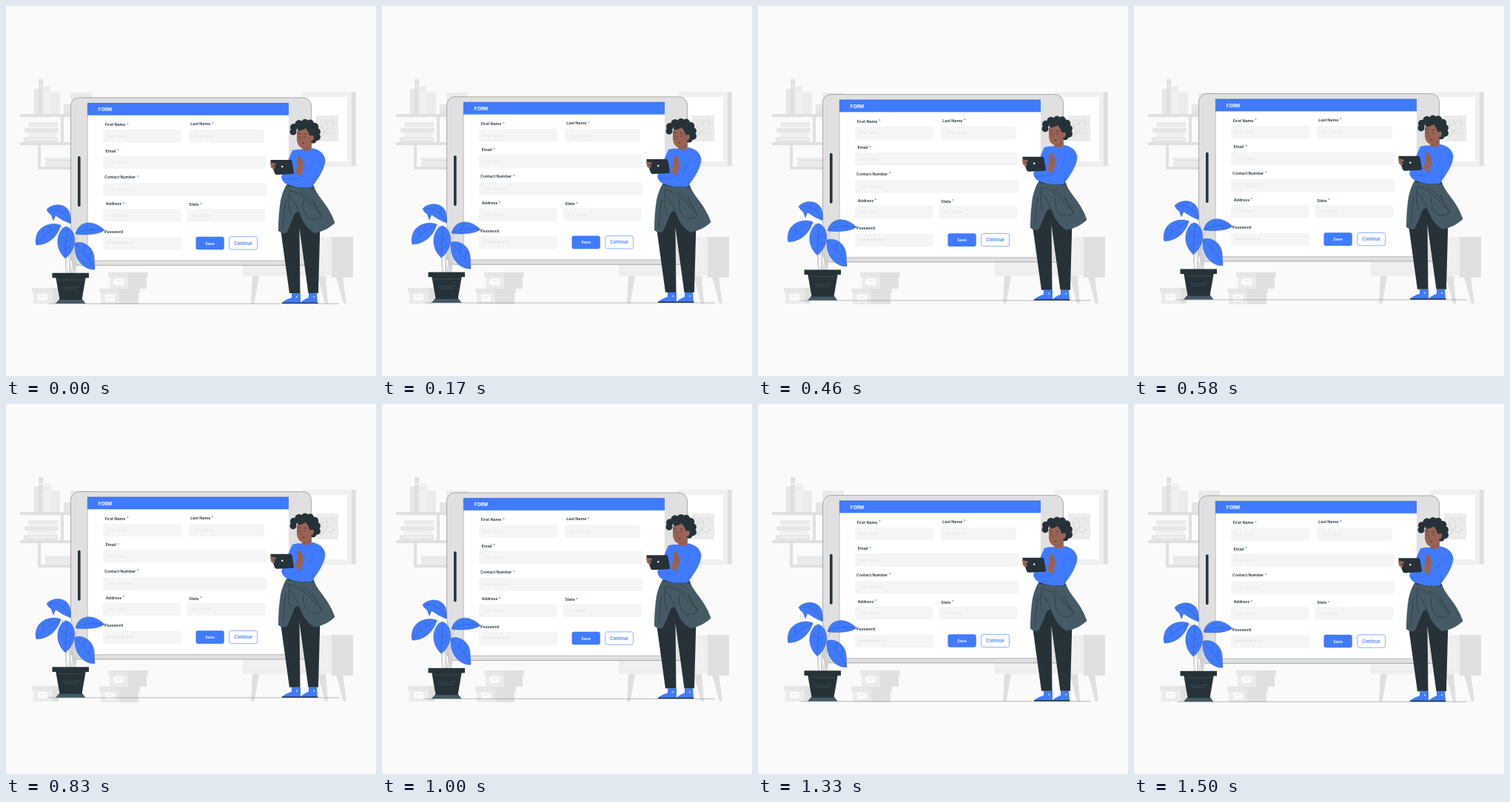
These frames come from a looping animation (500 px wide and 500 px high, 1.54 s). An HTML page with a canvas:

```html
<!DOCTYPE html>
<html lang="en">
<head>
<meta charset="utf-8">
<title>Form illustration</title>
<style>
  html, body { margin: 0; width: 100%; height: 100%; overflow: hidden; background: #fafafa; }
  canvas { display: block; width: 500px; height: 500px; }
</style>
</head>
<body>
<canvas id="stage"></canvas>
<script>
const LOOP = 1540, LIFT = 5.8, LEAD = 60, BASE = 0.15;
const BLUE = '#407bff', DARK = '#263238', SLATE = '#455a64', SKIN = '#996456';
const G1 = '#e0e0e0', G2 = '#e6e6e6', G3 = '#ebebeb', G4 = '#f0f0f0', G5 = '#f5f5f5';
const canvas = document.getElementById('stage');
const ctx = canvas.getContext('2d');
const scale = window.devicePixelRatio || 1;
canvas.width = canvas.height = 500 * scale;

function rect(x1, y1, x2, y2, fill) {
  ctx.fillStyle = fill;
  ctx.fillRect(x1, y1, x2 - x1, y2 - y1);
}

function round(x1, y1, x2, y2, r, fill, line, width = 0.6) {
  ctx.beginPath();
  ctx.roundRect(x1, y1, x2 - x1, y2 - y1, r);
  ctx.fillStyle = fill;
  ctx.fill();
  if (line) {
    ctx.strokeStyle = line;
    ctx.lineWidth = width;
    ctx.stroke();
  }
}

function shape(d, fill, line, width = 0.5) {
  const path = new Path2D(d);
  if (fill) {
    ctx.fillStyle = fill;
    ctx.fill(path);
  }
  if (line) {
    ctx.strokeStyle = line;
    ctx.lineWidth = width;
    ctx.stroke(path);
  }
}

function dot(x, y, r, fill) {
  ctx.beginPath();
  ctx.arc(x, y, r, 0, 7);
  ctx.fillStyle = fill;
  ctx.fill();
}

function text(str, x, y, size, weight, fill, align = 'left') {
  ctx.font = `${weight} ${size}px Inter, sans-serif`;
  ctx.textAlign = align;
  ctx.textBaseline = 'alphabetic';
  ctx.fillStyle = fill;
  ctx.fillText(str, x, y);
  return ctx.measureText(str).width;
}

function bookshelf() {
  rect(87, 117, 116, 128, G3);
  rect(38, 112, 44, 146, G2);
  rect(44, 99, 50, 146, G1);
  rect(50, 108, 61, 146, G4);
  rect(52, 113, 59, 114, G1);
  rect(61, 117, 73, 146, G3);
  rect(78, 133, 88, 146, G2);
  rect(44, 107, 50, 109, G4);
  round(30, 157, 70, 164, 2, G3);
  round(25, 165, 71, 171, 2, G2);
  round(30, 171, 68, 177, 2, G4);
  round(24, 177, 70, 184, 2, G2);
  rect(30, 179, 68, 181, G4);
  rect(53, 205, 88, 217, G3);
  rect(56, 208, 88, 209, G1);
  rect(19, 146, 88, 150, G1);
  rect(19, 184, 88, 188, G1);
  rect(43, 217, 88, 221, G1);
  rect(74, 150, 78, 184, G1);
  rect(43, 188, 47, 217, G1);
}

function picture() {
  rect(400, 116, 473, 216.5, G1);
  rect(400, 116, 467, 216.5, G4);
  rect(405, 123, 461, 210, '#fff');
  rect(419, 148, 449, 183, G3);
  shape('M424 173C420 164 430 157 434 160C444 144 448 163 435 166C420 176 424 184 434 167C438 155 424 148 426 160C429 171 442 178 444 168',
    null, G1, 1.6);
}

function cabinet() {
  shape('M333 365H342L335.5 402H331Z M421.5 365H432L435 402H431Z M446 366H455L460 402H456Z', G1);
  rect(320, 312, 440, 365, G4);
  rect(440, 312, 469, 367, G1);
  shape('M323 316H437V361H323Z M381 316V361', null, G2, 0.8);
}

function storageBox(x, y, w, split, h) {
  rect(x + 2, y + 6, x + w - 2, y + 6 + h, G1);
  rect(x + 2, y + 6, x + split, y + 6 + h, G3);
  rect(x, y, x + w, y + 6, G1);
  rect(x, y, x + split, y + 6, G2);
  round(x + 8, y + 8, x + 21, y + 17, 1, '#fafafa');
  rect(x + 11, y + 11, x + 18, y + 12, G2);
}

function field(label, lx, ly, x1, y1, x2, hint, hx, star = true) {
  round(x1, y1, x2, y1 + 17.5, 2.5, G5);
  const w = text(label, lx, ly, 5.3, 600, DARK);
  if (star) text('*', lx + w + 1.5, ly - 0.3, 5.3, 600, BLUE);
  text(hint, hx, y1 + 10.6, 5.2, 400, '#e3e3e3');
}

function device() {
  round(87.5, 123.8, 412.5, 350.3, 11, G1, '#777d80', 0.6);
  rect(110, 131, 382, 344, '#fff');
  shape('M110.2 131V344H382', null, '#818789', 0.5);
  round(97, 203, 100.6, 271, 1.6, DARK);
  rect(110, 131, 382, 147.6, BLUE);
  shape('M110 131.2H382', null, '#3159a9', 0.5);
  text('FORM', 124.8, 142, 6.2, 700, '#fff');

  field('First Name', 133.8, 162, 131, 167, 237, 'Your Name', 136);
  field('Last Name', 249.2, 161, 247, 167, 349, 'Your Name', 254);
  field('Email', 134.8, 197.5, 131, 202.3, 352, 'Your Name', 137);
  field('Contact Number', 133, 233, 131, 239.2, 352, 'Your Number', 137.5);
  field('Address', 134.8, 269, 131, 274, 236, 'Your Name', 137);
  field('State', 247.2, 270, 244.6, 274, 350.4, 'Your Name', 250);
  field('Password', 133, 306.6, 131, 312, 237, '', 136, false);
  for (let i = 0; i < 7; i++) text('*', 138.6 + i * 5.1, 325.2, 9, 600, G1, 'center');

  round(256.5, 311.6, 294.8, 329.2, 3, BLUE);
  text('Save', 275.6, 322.5, 5.4, 600, '#fff', 'center');
  round(301.7, 311.7, 339.6, 329, 3, '#fff', BLUE, 0.6);
  text('Continue', 320.6, 322.5, 5.6, 600, BLUE, 'center');
}

function leaf(outline, veins) {
  shape(outline, BLUE, '#2c4f9c', 0.4);
  shape(veins, null, '#2b509f', 0.5);
}

function plant() {
  const stems = 'M82 362Q80 340 81 325 M86 362Q87 325 75 297 M89 362Q92 320 87 292 M92 362Q90 318 99 306 M93 362Q94 345 98 333';
  shape(stems, null, '#9a9fa1', 1.8);
  shape(stems, null, '#fafafa', 1);
  leaf('M55 275C62 267 80 265 86 279Q88 287 87.5 294C78 291 70 285 67 283L64 290L61 282Q57 280 55 275Z',
    'M58 275Q77 272 87 293 M70 275L73 270 M78 280L81 274');
  leaf('M74 296C60 291 44 298 41 311Q39 318 41 323C56 323 70 312 74 296Z',
    'M42 321Q55 305 73 297 M52 311L49 302 M60 304L58 297');
  leaf('M94 308C98 290 118 288 133 303C125 309 107 310 94 308Z',
    'M95 307Q112 299 131 303 M107 302L111 296 M116 301L122 306');
  leaf('M93 320.5C101 317 116 322 119 338L120 356C106 357 91 343 93 320.5Z',
    'M94 322Q108 334 119 354 M105 333L107 323 M112 342L115 332');
  leaf('M81 298C70 302 63 325 80 341C94 331 98 308 84 299Z',
    'M83 300Q80 319 80 338 M81 316L74 311 M81 319L89 314 M80 329L88 324');
  shape('M67 402L72 396H103L107.5 402Z', SLATE);
  shape('M67 365H108L102.5 397H72.5Z', DARK);
  rect(62.5, 360.7, 112, 367.3, DARK);
  shape('M69 370H106 M76 380Q88 382 100 379 M78 383H97', null, SLATE, 0.6);
}

function legs() {
  shape('M386 388H398V401.5H373Q374 398 386 394Z', BLUE);
  shape('M409 388H420L421 401.5H398Q399 398 409 394Z', BLUE);
  shape('M373 400.6H398V402H373Z M398 400.6H421.5V402H398Z', DARK);
  dot(393, 393, 1, '#dce6ff');
  dot(416, 393, 1, '#dce6ff');
  shape('M379 245H414L424.5 295L422 388H408.5L396.5 300L397.5 388H383L371 301Z', DARK);
}

function jacket() {
  shape('M380 240L416 243C418 252 430 265 436 275Q441 283 444.5 293C438 300 427 305 417 307Q408 302 402 292L396 279Q390 276 387 289L379.5 306Q374 309 368 304Q368 282 371 263Q374 249 380 240Z', SLATE);
  shape('M380 240L416 243L415 246Q396 246 381 243Z', DARK);
  shape('M382 249Q400 251 420 278 M398 252Q413 258 426 284 M385 283Q380 267 383 250 M396 279Q391 264 383 257 M402 262Q399 278 410 287Q423 291 427 282Q419 274 414 260 M374 301Q375 280 378 262',
    null, DARK, 0.6);
}

function torso() {
  shape('M400 185H413V195Q409 201 400 197Z', SKIN);
  shape('M387 195Q396 193 401 194Q408 199 414 192Q429 195 431.5 208C431 219 424 230 416 241L414 245Q395 247 380 241Q374 239 372 231L383 204Z', BLUE);
  shape('M386 207Q382 218 389 227 M415 207Q414 217 409 224 M374 234Q390 236 402 229 M414 244L416 230',
    null, '#2f5fc5', 0.5);
  shape('M391 226L393 216L394.5 204Q397 200 398.5 205L402 211L402.5 217L398 230Z', SKIN);
  shape('M395 214L397 205 M398 216L400 208', null, '#6f4133', 0.4);
  shape('M357 212Q361 208 366 212V222L360 220Z', SKIN);
  shape('M358 208H384Q386 208 386.5 210L389 225Q389 227 387 227L366 228Q364 228 363 226L357.5 210Q357 208 358 208Z', DARK);
  shape('M357 211L365 213L364 216L360 215L364 218L362 221L358 218Z', SKIN);
  dot(373.3, 217, 1.2, '#fff');
}

function head() {
  const curls = [[389, 164, 5], [396, 159.5, 5.5], [404, 157.5, 4.7], [411, 158.5, 5], [417, 163, 5.3],
    [420, 170, 5], [420, 177, 5], [415, 181, 4.6], [388, 170, 4.5], [403, 166, 9], [411, 172, 9]];
  for (const [x, y, r] of curls) dot(x, y, r, DARK);
  shape('M393 169Q401 168 405 165Q409 170 411 176Q415 173 416 177Q416 182 412 183L411 188Q405 194 400 192Q394 190 393 181Z', SKIN);
  shape('M394 173Q396 171 398 173 M402.5 173Q405 171.5 407 174', null, DARK, 0.7);
  dot(396.4, 177, 0.7, DARK);
  dot(404.3, 177, 0.7, DARK);
  shape('M399 176L397.5 181.5H399.5', null, '#6f4133', 0.5);
  shape('M400 185.5Q402 184.6 404 185.5Q402 187.4 400 185.5Z', '#54281f');
  shape('M402 193Q408 193 411 188', null, '#6f4133', 0.6);
}

function draw(time) {
  const phase = (time + LEAD) / LOOP * 2 * Math.PI;
  const rise = LIFT * (1 - Math.cos(phase)) / 2;
  ctx.setTransform(scale, 0, 0, scale, 0, 0);
  rect(0, 0, 500, 500, '#fafafa');
  bookshelf();
  picture();
  cabinet();
  storageBox(35, 381, 38, 28, 15);
  storageBox(138, 360, 54, 27, 16);
  storageBox(126, 382, 55, 27, 15);

  ctx.translate(0, BASE - rise);
  device();
  shape('M58 402.2H450', null, '#707779', 0.5);
  plant();
  legs();
  jacket();
  torso();
  head();
}

function tick() {
  draw(performance.now() % LOOP);
  requestAnimationFrame(tick);
}
tick();
</script>
</body>
</html>
```
